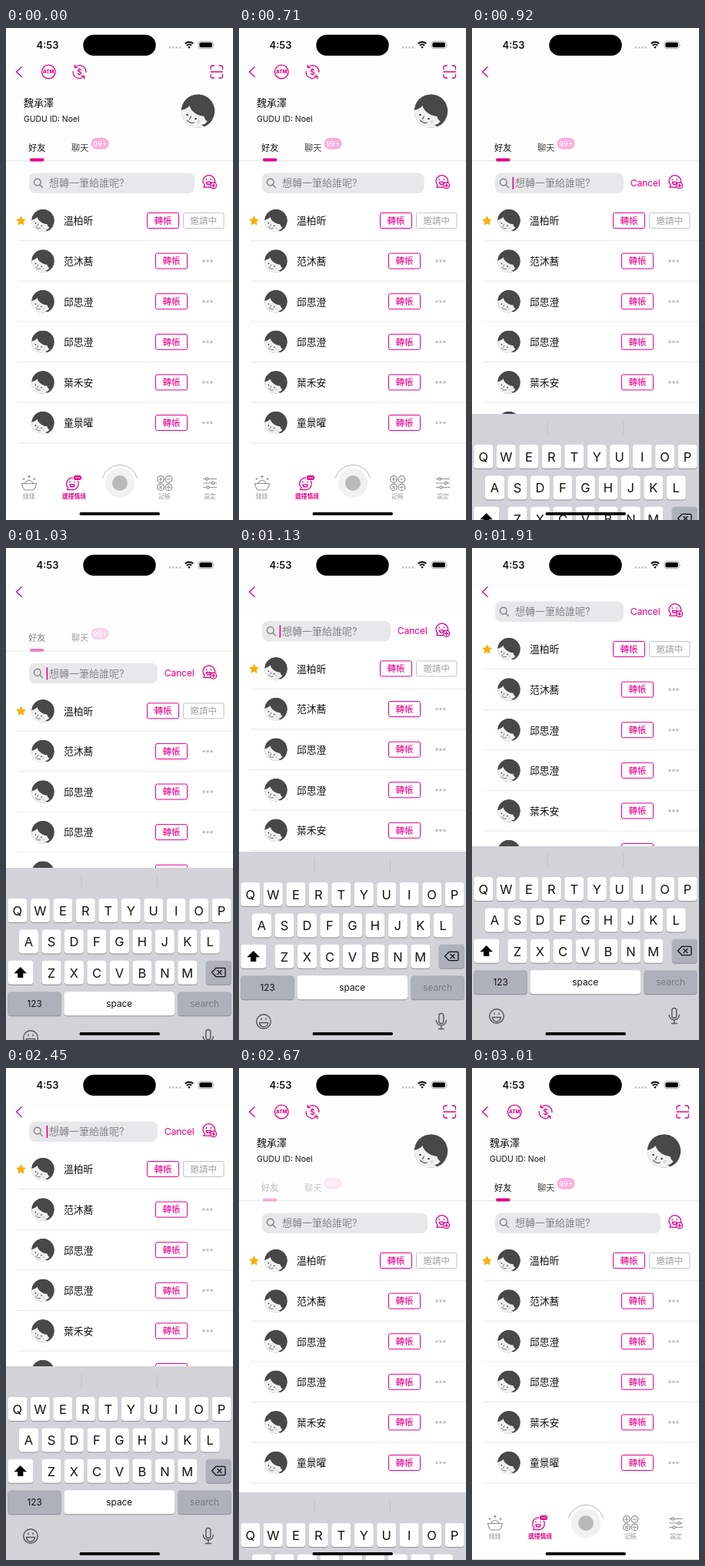
Write an HTML page that moves like this. It is 295x640 px and loops after 3080 ms.

```html
<!DOCTYPE html>
<html lang="zh-Hant">
<head>
<meta charset="utf-8">
<title>好友</title>
<style>
  html, body { margin: 0; width: 100%; height: 100%; overflow: hidden; background: #fff; }
  svg { display: block; width: 100vw; height: 100vh; }
  text { font-family: Inter, "Noto Sans CJK TC", "Noto Sans CJK", sans-serif; fill: #111; }
  .mid { text-anchor: middle; }
  .pink { fill: #e5008a; }
  .grey { fill: #999; }
  .line { fill: none; stroke: #e5008a; stroke-width: 1.3; stroke-linecap: round; stroke-linejoin: round; }
  .soft { fill: none; stroke: #8f8f8f; stroke-width: 1.2; stroke-linecap: round; stroke-linejoin: round; }
  .rule { stroke: #e9e9e9; }
  .name { font-size: 12.8px; }
  .btn { font-size: 11.5px; font-weight: 500; }
  .tab { font-size: 7.8px; }
  .key { font-size: 16.5px; }
  .word { font-size: 11.8px; }
</style>
</head>
<body>
<svg viewBox="0 0 295 640">
  <defs>
    <clipPath id="round"><circle r="21.8"/></clipPath>
    <symbol id="face" viewBox="-22 -22 44 44" overflow="visible">
      <g clip-path="url(#round)">
        <circle r="22" fill="#484848"/>
        <path d="M-22-1C-17-2-13-4-11-7C-9 0-2 6 8 7C9 12 12 14 16 14L10 24H-22Z" fill="#f1f1f1"/>
        <path d="M4 18C9 18 12 15 13 11L22 12V22H12Z" fill="#484848"/>
        <circle cx="-14" cy="5" r="1.3" fill="#444"/>
        <circle cx="-3" cy="10" r="1.3" fill="#444"/>
        <path d="M-14 12Q-10 17-5 15M-9 7L-11 10.5" fill="none" stroke="#555" stroke-width="1.2" stroke-linecap="round"/>
        <circle cx="1" cy="14" r="2" fill="#d8d8d8"/>
      </g>
    </symbol>
    <g id="bubble" class="line">
      <path d="M-6.5 8.2H-.5A7.8 7.8 0 1 0-6-3.9A7.8 7.8 0 0 0-5 5.6Z"/>
      <path d="M-3-2.4V-1.4M3-2.4V-1.4M-3 1.4H3A3 3 0 0 1-3 1.4Z"/>
    </g>
  </defs>

  <rect width="295" height="640" fill="#fff"/>

  <g id="page">
    <rect width="295" height="173" fill="#fdfdfd"/>
    <path id="edge" stroke="#e4e4e4" d="M0 172.8H295"/>
    <g id="tabs">
      <text x="29" y="160" font-size="11.2" font-weight="500">好友</text>
      <rect x="31" y="169.6" width="18.5" height="3.8" rx="1.9" class="pink"/>
      <text x="85" y="160" font-size="11.2" style="fill:#444">聊天</text>
      <rect x="110.5" y="142.7" width="23.3" height="15" rx="7.5" fill="#f8b0db"/>
      <text x="122.2" y="153.5" font-size="9.4" class="mid" style="fill:#fff">99+</text>
    </g>
    <rect id="field" x="30" y="188.5" width="215" height="26.5" rx="8" fill="#e8e8ea"/>
    <g class="soft" style="stroke:#808085;stroke-width:1.4"><circle cx="40.8" cy="200.6" r="4.4"/><path d="M44 204L47.5 207.5"/></g>
    <text x="56" y="206.4" font-size="13" style="fill:#87878c">想轉一筆給誰呢?</text>
    <rect id="caret" x="52.6" y="194" width="1.6" height="16" class="pink"/>
    <text id="cancel" y="206" font-size="12.3" letter-spacing="-.3" class="pink">Cancel</text>
    <use href="#bubble" x="263.3" y="199"/>
    <g class="line"><circle cx="269.6" cy="204.8" r="3.9" fill="#fff"/><path d="M267.6 204.8H271.6M269.6 202.8V206.8"/></g>
    <g id="rows"></g>
  </g>

  <path class="line" d="M20.3 50.8L13.4 57L20.3 63.2"/>
  <g id="header">
    <circle cx="55.3" cy="57" r="8.8" class="line"/>
    <text x="55.3" y="59.4" font-size="6.4" font-weight="800" class="mid pink">ATM</text>
    <path class="line" d="M89.5 51.2A8.4 8.4 0 0 1 103.9 57.4M101.5 62.9A8.4 8.4 0 0 1 87.1 56.6M89.3 48.3V51.6H92.6M101.7 65.8V62.5H98.4"/>
    <text x="95.5" y="60.8" font-size="10" font-weight="600" class="mid pink">$</text>
    <path class="line" d="M266 53.5V51.5A2.5 2.5 0 0 1 268.5 49H270.5M277 49H279A2.5 2.5 0 0 1 281.5 51.5V53.5M281.5 60.5V62.5A2.5 2.5 0 0 1 279 65H277M270.5 65H268.5A2.5 2.5 0 0 1 266 62.5V60.5M266 57H281.5"/>
    <text x="23" y="101.6" font-size="13">魏承澤</text>
    <text x="23" y="122" font-size="10.4">GUDU ID: Noel</text>
    <use href="#face" x="227.5" y="86" width="44" height="44"/>
  </g>

  <g id="bar">
    <rect y="568" width="295" height="72" fill="#fff"/>
    <g class="soft">
      <path d="M20.5 592.5H39.5Q38 601 34 601H26Q22 601 20.5 592.5ZM24.5 592.5Q30 584 35.5 592.5M30 582V585M28.5 583.5H31.5M23 585.5V587.5M22 586.5H24M37 585.5V587.5M36 586.5H38"/>
      <g id="sums"></g>
      <path d="M256.5 586.5H273.5M256.5 592H273.5M256.5 597.5H273.5"/>
      <g fill="#fff"><circle cx="261" cy="586.5" r="1.7"/><circle cx="269" cy="592" r="1.7"/><circle cx="262.5" cy="597.5" r="1.7"/></g>
    </g>
    <use href="#bubble" x="86" y="592.5"/>
    <rect x="87.5" y="581.5" width="11" height="7" rx="3" class="pink" stroke="#fff"/>
    <path d="M90.5 585H96" stroke="#fff" stroke-width="1.3" stroke-dasharray="1.3 .8"/>
    <path d="M125.5 585A23.5 23.5 0 0 1 170.500 585" class="soft" style="stroke:#a5a5a5;stroke-width:.8"/>
    <circle cx="148" cy="592" r="19" fill="#f1f1f1"/>
    <circle cx="148" cy="592" r="10" fill="#b9b9b9"/>
    <text x="29.5" y="611.5" class="tab mid grey">錢錢</text>
    <text x="88.5" y="611.5" class="tab mid pink" font-weight="700">選擇情境</text>
    <text x="206" y="611.5" class="tab mid grey">記帳</text>
    <text x="265" y="611.5" class="tab mid grey">設定</text>
  </g>

  <g id="board">
    <rect width="295" height="256" fill="#d2d3d9"/>
    <path d="M98 10V28M196.5 10V28" stroke="#c1c2c8"/>
    <g id="keys"></g>
    <path d="M18.7 129L27 137.3H22.3V143H15.1V137.3H10.4Z"/>
    <path d="M267.5 136L273 130.3H283.5Q285 130.3 285 131.8V140.2Q285 141.7 283.5 141.7H273ZM275 133.5L280 138.5M280 133.5L275 138.5"
      fill="none" stroke="#111" stroke-width="1.3" stroke-linejoin="round" stroke-linecap="round"/>
    <g fill="none" stroke="#55585e" stroke-width="1.4" stroke-linecap="round">
      <circle cx="32" cy="221" r="9.3"/>
      <path d="M26.5 222.5H37.5A5.5 5.5 0 0 1 26.5 222.5ZM29 217V218.5M35 217V218.5"/>
      <rect x="259.8" y="210.5" width="6" height="13" rx="3"/>
      <path d="M256.3 219.5A6.5 6.5 0 0 0 269.3 219.5M262.8 226.5V230.5M259.3 230.5H266.3"/>
    </g>
  </g>

  <g id="status">
    <text x="54" y="26.5" font-size="13" font-weight="600" class="mid">4:53</text>
    <rect x="100.3" y="8.7" width="94.4" height="27.3" rx="13.6"/>
    <path d="M213 25.3H227" stroke="#c6c6c6" stroke-width="2.7" stroke-linecap="round" stroke-dasharray="0 4.3"/>
    <path d="M232.8 20.3A7.6 7.6 0 0 1 243.2 20.3M234.9 22.8A4.5 4.5 0 0 1 241.1 22.8" fill="none" stroke="#000" stroke-width="1.9"/>
    <path d="M238 26.8L236.2 24.8A2.6 2.6 0 0 1 239.8 24.8Z"/>
    <rect x="250" y="17.3" width="19.3" height="9.4" rx="3" fill="none" stroke="#aaa" stroke-width=".9"/>
    <rect x="251.4" y="18.7" width="16.5" height="6.6" rx="1.8"/>
    <path d="M270.6 20.3Q272.2 22 270.6 23.7Z" fill="#aaa"/>
    <rect x="95.5" y="630" width="104.5" height="3.8" rx="1.9"/>
  </g>
</svg>
<script>
  const $ = id => document.getElementById(id);

  const button = (x, y, w, label, ink, edge) =>
    `<rect x="${x}" y="${y - 10}" width="${w}" height="20" rx="2" fill="#fff" stroke="${edge}"/>
     <text x="${x + w / 2}" y="${y + 4.2}" class="btn mid" style="fill:${ink}">${label}</text>`;

  const pink = '#e5008a';
  const star = Array.from({ length: 10 }, (_, i) => {
    const r = i % 2 ? 3.4 : 6.8, a = (i / 5 - 0.5) * Math.PI;
    return [19.5 + r * Math.cos(a), 251 + r * Math.sin(a)].map(n => n.toFixed(2));
  }).join(' ');

  $('rows').innerHTML = ['溫柏昕', '范沐蕎', '邱思澄', '邱思澄', '葉禾安', '童景曜'].map((name, i) => {
    const y = 250.5 + i * 52.6;
    const tail = i
      ? button(194.5, y, 41, '轉帳', pink, pink) +
        [257, 262, 267].map(x => `<circle cx="${x}" cy="${y}" r="1.8" fill="#c2c2c2"/>`).join('')
      : `<polygon points="${star}" fill="#f8ae0c"/>` +
        button(183.5, y, 41, '轉帳', pink, pink) + button(230.5, y, 52.5, '邀請中', '#a0a0a0', '#c4c4c4');
    return `<use href="#face" x="33" y="${y - 15}" width="30" height="30"/>
      <text x="75" y="${y + 4.8}" class="name">${name}</text>${tail}
      <path class="rule" d="M15 ${y + 26.2}H295"/>`;
  }).join('');

  const signs = ['M-2 0H2M0-2V2', 'M-2 0H2', 'M-1.5-1.5L1.5 1.5M1.5-1.5L-1.5 1.5', 'M-2 0H2M0-2V-2M0 2V2'];
  $('sums').innerHTML = signs.map((d, i) =>
    `<g transform="translate(${201 + i % 2 * 10.4} ${587 + (i >> 1) * 10.4})"><circle r="4.3"/><path d="${d}"/></g>`).join('');

  const key = (x, row, w, label = '', cls = 'key', fill = '#fff', ink = '#111') => {
    const y = 40 + row * 40.4;
    return `<rect x="${x}" y="${y + 1}" width="${w}" height="31" rx="4" fill="#8d8f95"/>
      <rect x="${x}" y="${y}" width="${w}" height="31" rx="4" fill="${fill}"/>
      <text x="${x + w / 2}" y="${y + (cls === 'key' ? 21.7 : 19.8)}" class="${cls} mid" style="fill:${ink}">${label}</text>`;
  };
  const dark = '#adb1bb';
  const starts = [2.4, 17, 46.5];
  $('keys').innerHTML = ['QWERTYUIOP', 'ASDFGHJKL', 'ZXCVBNM'].map((line, row) =>
    [...line].map((c, i) => key(starts[row] + i * 29.47, row, 25, c)).join('')).join('') +
    key(2.4, 2, 33) + key(259.8, 2, 33, '', 'key', dark) +
    key(2.4, 3, 69.3, '123', 'word', dark) + key(75.5, 3, 143.5, 'space', 'word') +
    key(223.5, 3, 69.3, 'search', 'word', dark, '#787b83');

  const loop = 3080;
  const ticks = [0, 710, 820, 920, 1030, 1130, 1240, 1440, 1550, 1790, 1910, 2450, 2560, 2670, 2780, 2900, 3010];
  const ramp = (t, a, b) => Math.min(1, Math.max(0, (t - a) / (b - a)));
  // Share of the distance still to go in a critically damped spring.
  const rest = ms => {
    const x = Math.max(0, ms) * 0.0174;
    return (1 + x) * Math.exp(-x);
  };
  const shift = (id, y) => $(id).setAttribute('transform', `translate(0 ${y.toFixed(2)})`);
  const fade = (id, a) => $(id).setAttribute('opacity', a);

  function draw(t) {
    const closing = t >= 2542;
    const boardTop = closing ? 640 - 252 * rest(t - 2542) : 388 + 252 * rest(t - 814.6);
    shift('board', Math.round(boardTop));
    shift('page', closing ? 0 : -119 * (1 - rest(t - 963)));

    const open = ramp(t, 690, 910) * (1 - ramp(t, 2500, 2600));
    const width = 215 - 48 * open;
    $('field').setAttribute('width', width);
    $('cancel').setAttribute('x', 38.8 + width);
    fade('cancel', open * open);

    fade('header', t < 820 || closing ? 1 : 0);
    fade('bar', t < 920 || closing ? 1 : 0);
    fade('edge', t < 1100 || closing ? 1 : 0);
    fade('tabs', closing ? ramp(t, 2610, 2820) : 1 - ramp(t, 980, 1080));

    const blink = t >= 2450 ? 1 : 1 - ramp(t, 1740, 1850);
    fade('caret', t < 820 || closing ? 0 : blink);
  }

  const begin = performance.now();
  let last = -1;
  function frame() {
    const now = (performance.now() - begin) % loop;
    const tick = ticks.filter(t => t <= now).pop() ?? 0;
    if (tick !== last) draw(last = tick);
    requestAnimationFrame(frame);
  }
  frame();
</script>
</body>
</html>
```
